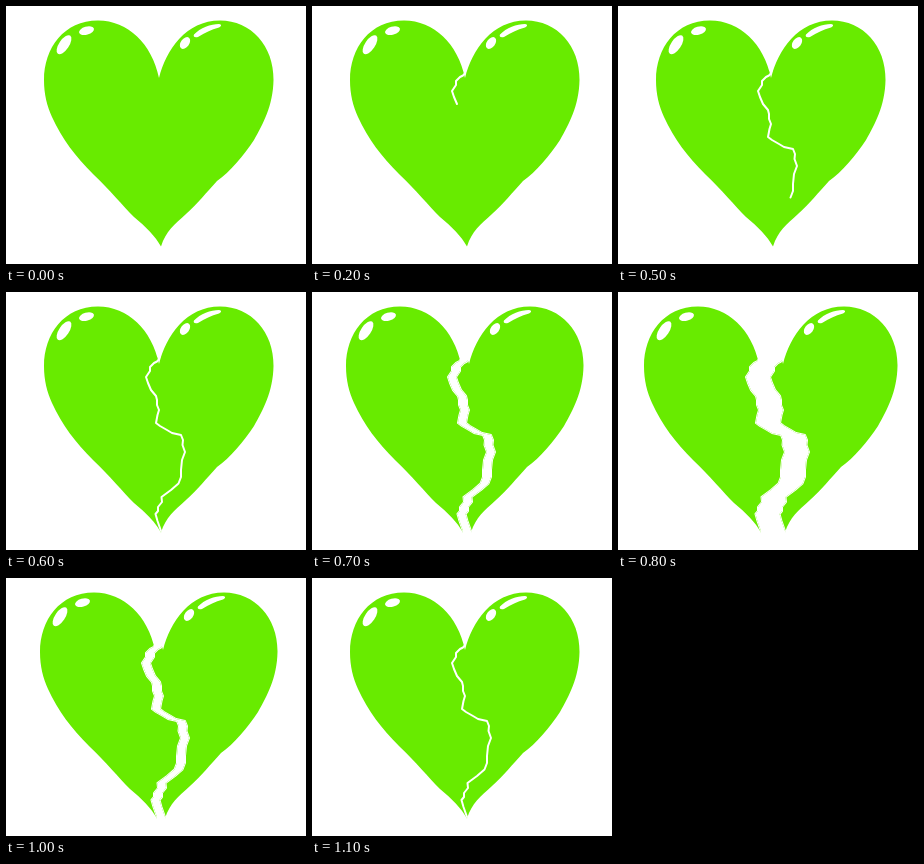
Recreate the animation shown at these times as an HTML page. Size 300 px wide and 258 px high, loop 1200 ms.

```html
<!DOCTYPE html>
<html lang="en">
<head>
<meta charset="utf-8">
<title>Breaking heart</title>
<style>
  html, body { margin: 0; width: 100%; height: 100%; overflow: hidden; background: #fff; }
  svg { display: block; width: 100%; height: 100%; }
  .crack { fill: none; stroke: #fff; stroke-width: 2; stroke-linejoin: round; stroke-linecap: round; }
</style>
</head>
<body>
<svg viewBox="0 0 300 258">
  <defs>
    <clipPath id="leftSide"><path id="leftArea"/></clipPath>
    <clipPath id="rightSide"><path id="rightArea"/></clipPath>
    <g id="heart">
      <path fill="#68eb00" d="M153 72C146 38 122 14.5 92 14.5C58 14.5 38 42 38 74C38 88 41 100 46 111
        C56 133 70 151 87 168C104 184 117 200 128 211C140 221 149 230 155 240.5
        C160 225 168 219 180 208C192 197 200 187 211 175C224 166 238 149 248 134
        C257 118 267 100 267.5 74C268 40 245 14.5 214 14.5C180 14.5 160 44 153 72Z"/>
      <g fill="#fff">
        <ellipse rx="5" ry="11" transform="translate(58 38.7) rotate(34)"/>
        <ellipse rx="7.7" ry="4" transform="translate(80.5 24.7) rotate(-16)"/>
        <ellipse rx="4.2" ry="6.6" transform="translate(179 37) rotate(36)"/>
        <path d="M188 28.5C194 22 205 18 213 18C216 18.500 215.500 20.500 213 21.500C205 23.500 199 27 192 31C188.500 32 187 30.500 188 28.500Z"/>
      </g>
    </g>
  </defs>
  <g id="whole"><use href="#heart"/><path class="crack" id="growing"/></g>
  <g id="left"><g clip-path="url(#leftSide)"><use href="#heart"/><path class="crack split"/></g></g>
  <g id="right"><g clip-path="url(#rightSide)"><use href="#heart"/><path class="crack split"/></g></g>
</svg>
<script>
  const STEP = 100;
  const crack = [
    [153, 67], [151, 69.5], [148, 71], [144, 75], [144, 79], [140, 85], [142, 91], [145, 98],
    [150, 104], [151, 108], [151, 113], [153, 118], [151.5, 123], [150, 131], [154, 134],
    [161, 138], [166, 141], [175, 143], [177, 148], [176.5, 153], [179, 160], [176, 168],
    [175, 178], [175, 185], [172.5, 191.5], [165, 198], [155.5, 205], [156, 210], [152, 215],
    [152, 219], [149.5, 222], [151.500, 229], [155, 239]
  ];
  // Crack points visible and distance each half has moved, per step.
  const all = crack.length;
  const grown = [0, 4, 8, 13, 17, 25, all, all, all, all, all, all];
  const gaps = [0, 0, 0, 0, 0, 0, 0, 4, 12, 8, 4, 0];

  const byId = id => document.getElementById(id);
  const pathOf = points => points.length ? "M" + points.join("L") : "";
  const areaBeside = x => `${pathOf([[153, 0], ...crack, [155, 258]])}L${x} 258L${x} 0Z`;

  byId("leftArea").setAttribute("d", areaBeside(0));
  byId("rightArea").setAttribute("d", areaBeside(300));
  for (const path of document.querySelectorAll(".split")) path.setAttribute("d", pathOf(crack));

  function render(time) {
    const step = Math.floor(time / STEP) % gaps.length;
    const gap = gaps[step];
    byId("growing").setAttribute("d", pathOf(crack.slice(0, grown[step])));
    byId("whole").style.display = gap ? "none" : "";
    for (const [id, side] of [["left", -1], ["right", 1]]) {
      byId(id).style.display = gap ? "" : "none";
      byId(id).setAttribute("transform", `translate(${side * gap} 0)`);
    }
  }

  const start = performance.now();
  function tick() {
    render(performance.now() - start);
    requestAnimationFrame(tick);
  }
  tick();
</script>
</body>
</html>
```
